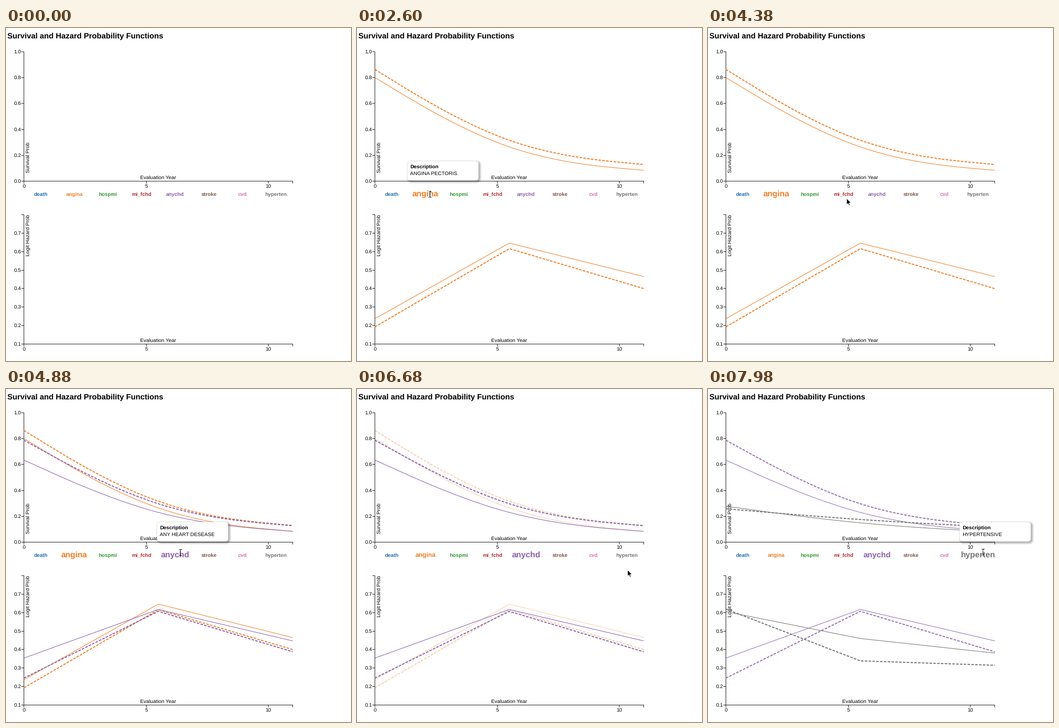
These frames come from a looping animation (761x736 px, 8 s). A matplotlib script:

```python
import numpy as np
import matplotlib.pyplot as plt
from matplotlib.animation import FuncAnimation
from matplotlib.patches import FancyBboxPatch, Polygon

W, H, DPI = 761, 736, 64
STEP, LOOP = 20, 8000
BASE, BIG = 11.4, 18.0          # label sizes in pixels
TIP_MS, WAIT_MS, FADE_MS = 500, 900, 5000
LEFT, RIGHT, YEARS = 39.5, 632.5, 11

plt.rcParams.update({
    "font.family": "Liberation Sans",
    "text.hinting": "none",
    "lines.scale_dashes": False,
    "toolbar": "None",
})


def pt(px):
    return px * 72 / DPI


fig = plt.figure(figsize=(W / DPI, H / DPI), dpi=DPI, facecolor="white")
ax = fig.add_axes([0, 0, 1, 1])
ax.set_xlim(0, W)
ax.set_ylim(H, 0)
ax.set_axis_off()


def text(x, y, s, size=BASE, **kw):
    return ax.text(x, y, s, fontsize=pt(size), **{"zorder": 2, **kw})


def line(xs, ys, color="black", width=1.0, **kw):
    return ax.plot(xs, ys, color=color, lw=pt(width), snap=False,
                   solid_capstyle="butt", solid_joinstyle="miter",
                   dash_capstyle="butt", **kw)[0]


def year_x(year):
    return LEFT + (RIGHT - LEFT) * year / YEARS


def pixel(v):
    return np.floor(v) + 0.5


class Panel:
    """One chart with its axes; maps values to pixel rows."""

    def __init__(self, top, low, high, ticks, label, label_end):
        self.low, self.bottom = low, top + 286
        self.scale = 286 / (high - low)
        bottom = self.bottom
        line([34, LEFT, LEFT, 34], [top, top, bottom, bottom])
        line([LEFT, LEFT, RIGHT, RIGHT],
             [bottom + 5, bottom, bottom, bottom + 5])
        for v in ticks:
            y = pixel(self.y(v))
            line([34, LEFT], [y, y])
            text(33.3, y + 3.8, f"{v:.1f}", ha="right")
        for year in (0, 5, 10):
            x = pixel(year_x(year))
            line([x, x], [bottom, bottom + 5])
            text(x, bottom + 14.3, str(year), ha="center")
        text(336, bottom - 3.5, "Evaluation Year", ha="center")
        text(53, label_end, label, ha="right", rotation=90,
             rotation_mode="anchor")

    def y(self, v):
        return self.bottom - (v - self.low) * self.scale


def basis(points, n=20):
    """Uniform cubic B-spline that starts and ends on the outer points."""
    a, b, c = points
    p = [a, a, a, b, c, c, c]
    u = np.linspace(0, 1, n)
    weights = ((1 - u) ** 3, 3 * u**3 - 6 * u**2 + 4,
               -3 * u**3 + 3 * u**2 + 3 * u + 1, u**3)
    return np.concatenate([
        sum(w * q for w, q in zip(weights, p[i:i + 4])) / 6 for i in range(4)])


text(3, 22.2, "Survival and Hazard Probability Functions", 17.12,
     weight="bold")
survival = Panel(52.5, 0, 1, np.arange(6) / 5, "Survival Prob", 252.3)
hazard = Panel(412.5, 0.1, 0.8, np.arange(1, 8) / 10, "Logit Hazard Prob",
               412.3)

COLORS = {
    "death": "#1f6fb0", "angina": "#f07f26", "hospmi": "#2f9a2f",
    "mi_fchd": "#b8292a", "anychd": "#8a62ad", "stroke": "#7e5247",
    "cvd": "#d870b4", "hyperten": "#757575",
}
legend = {}
for i, (name, color) in enumerate(COLORS.items()):
    x = LEFT + (RIGHT - LEFT) * (i + 0.5) / len(COLORS)
    legend[name] = text(x, 371.5, name, color=color, weight="bold",
                        ha="center")


def draw_pair(rates, color, z, **style):
    """Hazard polyline and the survival curve that follows from it."""
    rates = np.array(rates)
    years = np.linspace(0, YEARS, len(rates))
    alive = np.cumprod(1.137 - 1.42 * rates)
    return [
        line(year_x(basis(years)), survival.y(basis(alive)), color, zorder=z,
             **style),
        line(year_x(years), hazard.y(rates), color, zorder=z, **style),
    ]


def draw_tooltip(x, body):
    y, w, h = 294, 157, 43
    parts = []

    def box(shift, grow, **kw):
        corner = (x + shift - grow, y + shift - grow)
        style = f"round,pad=0,rounding_size={7 + grow}"
        patch = FancyBboxPatch(corner, w + 2 * grow, h + 2 * grow,
                               boxstyle=style, zorder=7, **kw)
        parts.append(ax.add_patch(patch))

    for grow in range(-1, 5):
        box(2.5, grow, fc="black", ec="none", alpha=0.06)
    box(0, 0, fc="white", ec="#dddddd", lw=pt(0.5))
    parts.append(text(x + 6, 311, "Description", weight="bold", zorder=8))
    parts.append(text(x + 6, 325.2, body, zorder=8))
    return parts


def ease(u):
    u = min(max(u, 0), 1)
    return 4 * u**3 if u < 0.5 else 1 - 4 * (1 - u) ** 3


class Hover:
    """Lines, label and tooltip shown after the pointer enters a label."""

    def __init__(self, name, enter, leave, note, solid, dashed):
        self.enter, self.leave = enter, leave
        self.label = legend[name]
        self.tip = draw_tooltip(round(self.label.get_position()[0]) - 40, note)
        color, z = COLORS[name], 3 + enter / LOOP
        dash = (0, (pt(5.7), pt(2.7)))
        self.lines = (draw_pair(solid, color, z, width=1.2)
                      + draw_pair(dashed, color, z, width=2.2, ls=dash))

    def update(self, t):
        shown = t >= self.enter
        faded = ease((t - self.leave - WAIT_MS) / FADE_MS)
        level = 1 - faded if shown else 0
        self.label.set_fontsize(pt(BASE + (BIG - BASE) * level))
        for ln in self.lines:
            ln.set_visible(shown)
            ln.set_alpha(level)
        for part in self.tip:
            part.set_visible(shown and t < self.leave + TIP_MS)

    def inside(self, t):
        return self.enter <= t < self.leave


hovers = [
    Hover("angina", 2100, 3080, "ANGINA PECTORIS",
          solid=(0.237, 0.646, 0.465), dashed=(0.193, 0.616, 0.400)),
    Hover("anychd", 4680, 5680, "ANY HEART DESEASE",
          solid=(0.354, 0.617, 0.447), dashed=(0.246, 0.607, 0.388)),
    Hover("hyperten", 7480, LOOP, "HYPERTENSIVE",
          solid=(0.605, 0.460, 0.381), dashed=(0.619, 0.339, 0.315)),
]

# Pointer stops: time, x, y
STOPS = [
    (660, 19, 362), (860, 44, 372), (1000, 44, 372), (1600, 139, 417),
    (2200, 158, 367), (3000, 163, 367), (3580, 181, 402), (4880, 384, 361),
    (5580, 390, 366), (6080, 434, 415), (6680, 597, 400), (7980, 606, 360),
]
times, stop_x, stop_y = zip(*STOPS)
ARROW = np.array([(0, 0), (0, 13.6), (3.1, 10.8), (5.2, 15.6), (7.4, 14.6),
                  (5.3, 10), (9.6, 9.8)])
half_beam = [(-3, -7), (0, -6), (3, -7), (0, -6)]
BEAM = np.array(half_beam + [(x, -y) for x, y in half_beam[::-1]])
arrow = ax.add_patch(Polygon(ARROW, fc="black", ec="white", lw=pt(0.9),
                             zorder=10))
beam = line(*BEAM.T, color="#222222", width=1.1, zorder=10)


def held(t):
    """Start of the 100 ms step that is on screen at time t."""
    phase = 60 if t < 1100 else 0 if t < 3500 else 80
    return (t - phase) // 100 * 100 + phase


def update(i):
    t = held(i * STEP)
    for hover in hovers:
        hover.update(t)
    pos = np.array([np.interp(t, times, stop_x), np.interp(t, times, stop_y)])
    on_text = any(hover.inside(t) for hover in hovers)
    arrow.set_visible(t >= times[0] and not on_text)
    beam.set_visible(on_text)
    arrow.set_xy(ARROW + pos)
    beam.set_data(*(BEAM + pos + 0.5).T)
    return []


anim = FuncAnimation(fig, update, frames=LOOP // STEP, interval=STEP,
                     repeat=True, repeat_delay=0)
plt.show()
```
